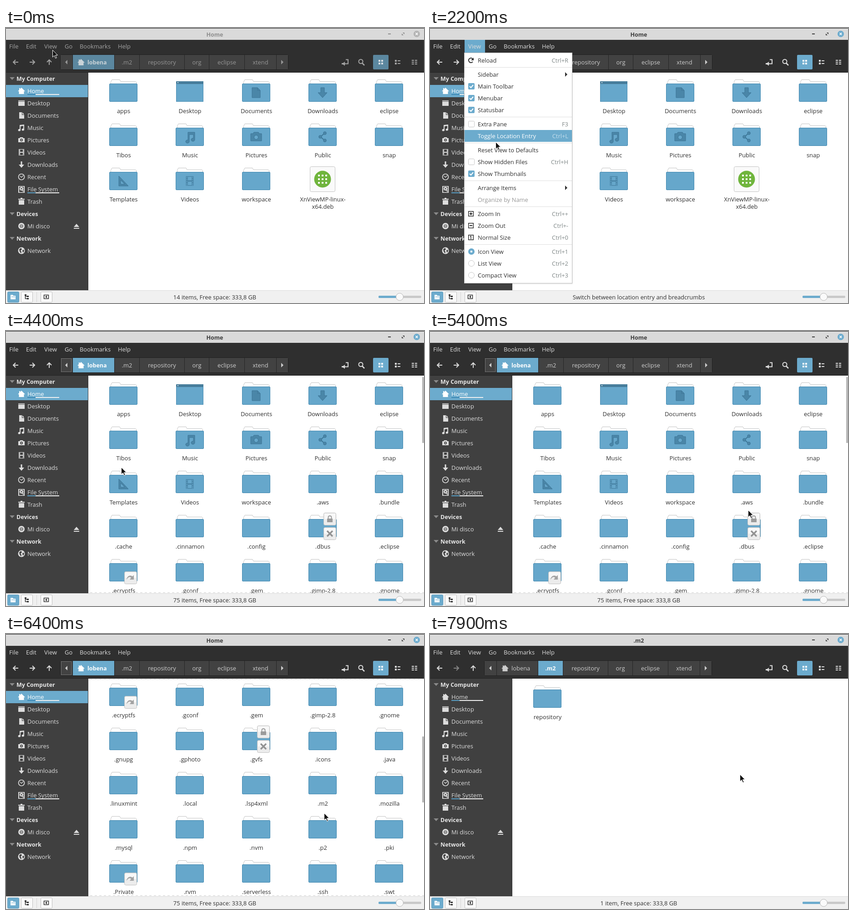
Recreate the animation shown at these times as an HTML page. Size 919 px wide and 604 px high, loop 8000 ms.

```html
<!DOCTYPE html>
<html lang="en">
<head>
<meta charset="utf-8">
<title>File manager</title>
<style>
html, body { margin: 0; width: 100%; height: 100%; overflow: hidden; background: #fff; }
svg { display: block; width: 919px; height: 604px; font: 12.9px 'Open Sans', 'Noto Sans', sans-serif; }
</style>
</head>
<body>
<svg id="stage" viewBox="0 0 919 604"></svg>
<script>
const stage = document.getElementById('stage');
const BLUE = '#6cabcd', LIGHT = '#dcdcdc', DARK = '#303030';

const rect = (x, y, w, h, fill, more = '') => `<rect x="${x}" y="${y}" width="${w}" height="${h}" fill="${fill}" ${more}/>`;
const box = (x, y, w, h, fill, line, r = 2) => rect(x + .5, y + .5, w - 1, h - 1, fill, `stroke="${line}" rx="${r}"`);
const circle = (x, y, r, fill, more = '') => `<circle cx="${x}" cy="${y}" r="${r}" fill="${fill}" ${more}/>`;
const shape = (d, fill, more = '') => `<path d="${d}" fill="${fill}" ${more}/>`;
const line = (d, color, w = 1, more = '') => shape(d, 'none', `stroke="${color}" stroke-width="${w}" ${more}`);
const at = (x, y, s) => `<g transform="translate(${x} ${y})">${s}</g>`;
const text = (x, y, s, fill, anchor = 'start', more = '') =>
  `<text x="${x}" y="${y}" fill="${fill}" text-anchor="${anchor}" ${more}>${s}</text>`;
const bold = 'font-weight="700" font-size="12.5"';

function mix(a, b, k) {
  const part = (c, i) => parseInt(c.slice(i, i + 2), 16);
  return `rgb(${[1, 3, 5].map(i => Math.round(part(a, i) + (part(b, i) - part(a, i)) * k))})`;
}

// Piecewise linear track of [frame, ...values]
function track(keys, f) {
  let i = keys.findIndex(k => k[0] > f);
  if (i < 0) return keys[keys.length - 1].slice(1);
  if (i === 0) return keys[0].slice(1);
  const a = keys[i - 1], b = keys[i], k = (f - a[0]) / (b[0] - a[0]);
  return a.slice(1).map((v, j) => Math.round(v + (b[j + 1] - v) * k));
}
const pointer = [[19, 102, 48], [20, 108, 78], [21, 126, 160], [22, 144, 250], [23, 154, 266], [24, 160, 272],
  [26, 160, 272], [27, 160, 280], [28, 160, 281], [29, 160, 281], [31, 150, 284], [42, 150, 284], [50, 562, 345],
  [51, 562, 345], [52, 600, 366], [53, 692, 405], [54, 699, 393], [65, 699, 393], [69, 697, 316], [78, 697, 316], [79, 681, 308]];
const scroll = [[56, 0], [57, 70], [58, 205], [59, 331], [64, 392], [65, 400], [66, 402], [67, 403]];

// Icons drawn around their own centre
const home = c => shape('M0-7L8 1H5.500V7H-5.500V1H-8L-5-2V-6H-3V-4Z', c);
const doc = c => shape('M-5-7H1V-1H6V7H-5ZM2-7L6-2H2Z', c);
const note = c => shape('M-4-6L6-7V4A2.700 2.300 0 1 1 4 2V-4L-2-3V5A2.700 2.300 0 1 1-4 3Z', c);
const camera = (c, hole) => shape('M-7-4H-4L-3-6H3L4-4H7V5H-7Z', c) + circle(0, 0, 3, hole) + circle(0, 0, 1.3, c);
const film = (c, hole) => rect(-6, -7, 12, 14, c) + rect(-3, -6, 6, 5, hole) + rect(-3, 1, 6, 5, hole) +
  [-6, -3, 0, 3, 5].map(y => rect(-5, y, 1, 1.5, hole) + rect(4, y, 1, 1.5, hole)).join('');
const down = c => shape('M-1.500-7H1.500V0H6L0 7L-6 0H-1.500Z', c);
const disc = (c, hole) => circle(0, 0, 7, c) + circle(0, 0, 3.6, hole) + circle(0, 0, 2.4, c) + circle(0, 0, 1, hole);
const GREY = '#404040';
const sideIcons = [
  home, c => rect(-7, -6, 14, 12, c) + rect(-7, -4.5, 14, 1, GREY), doc, note, c => camera(c, GREY), c => film(c, GREY), down,
  c => circle(0, 0, 6.500, 'none', `stroke="${c}" stroke-width="1.700"`) + line('M-3-2L0 1L4-3', c, 1.3),
  c => rect(-7, -7, 14, 15, c) + rect(-5, -5.500, 10, 12, GREY) + circle(0, -1, 4, c) + circle(0, -1, 1.5, GREY) + line('M1 0L4 5', c, 2),
  c => shape('M-7-6H-2V-8H2V-6H7V-4H-7ZM-6-3H6V7H-6Z', c)
];
const sideNames = ['Home', 'Desktop', 'Documents', 'Music', 'Pictures', 'Videos', 'Downloads', 'Recent', 'File System', 'Trash'];
const globe = c => circle(0, 0, 7.5, c) + shape('M-5-3L-1-6L1-3L-2 0L0 3L-1 6L-4 2ZM2-1L6-2L5 3L3 4Z', GREY);

function sidebar(f, x, y) {
  const inHome = f < 75;
  let s = rect(0, 98, 181, 478, GREY) + rect(180, 98, 1, 478, '#383838');
  if (inHome) s += rect(0, 125, 180, 27, BLUE);
  if (f >= 36 && x < 180) s += rect(0, 260, 180, 27, '#555');
  [['My Computer', 111], ['Devices', 408], ['Network', 462]].forEach(([n, c]) =>
    s += shape(`M8 ${c - 3}H19L13.500 ${c + 3}Z`, '#8a8a8a') + text(23, c + 5, n, '#e6e6e6', 'start', bold));
  sideNames.forEach((n, i) => {
    const c = 138 + 27 * i, ink = i === 0 && inHome ? '#fff' : LIGHT;
    s += at(34, c, sideIcons[i](ink)) + text(47, c + 5, n, ink);
    if (i === 0 || i === 8) s += rect(47, c + 7, 18, 2, i === 0 && inHome ? '#3d89b5' : '#5a9fc5') + rect(65, c + 7, 52, 2, '#f0f0f0');
  });
  return s + at(34, 435, disc(LIGHT, GREY)) + text(47, 440, 'Mi disco', LIGHT) +
    shape('M149 437L155 430L161 437ZM149 439H161V441H149Z', LIGHT) + at(34, 489, globe(LIGHT)) + text(47, 494, 'Network', LIGHT);
}

const INK = '#4a86a8', FRONT = '#66a7cb';
const marks = {
  Documents: () => shape('M-9-11H3L9-5V11H-9Z', INK, 'stroke="#3c7596"') + line('M3-11V-5H9', '#3c7596'),
  Downloads: () => shape('M-4-11H4V0H10L0 11L-10 0H-4Z', INK, 'stroke="#3c7596"'),
  Music: () => shape('M-4-10H11V6A4 3.500 0 1 1 8 3V-5H-1V10A4 3.500 0 1 1-4 7Z', INK, 'stroke="#3c7596"'),
  Pictures: () => shape('M-12-7H-7L-5-10H5L7-7H12V9H-12Z', INK, 'stroke="#3c7596"') + circle(0, 1, 4.5, FRONT, 'stroke="#3c7596"'),
  Public: () => line('M5-8L-5 0L5 8', '#3c7596', 2) + circle(5, -8, 3.3, INK, 'stroke="#3c7596"') +
    circle(-5, 0, 3.3, INK, 'stroke="#3c7596"') + circle(5, 8, 3.3, INK, 'stroke="#3c7596"'),
  Templates: () => shape('M-10-11L11 11H-10ZM-6-2V7H3Z', INK, 'stroke="#3c7596" fill-rule="evenodd"'),
  Videos: () => at(0, 0, `<g transform="scale(1.4 1.5)">${film(INK, FRONT)}</g>`)
};
const badge = (y, d, more) => box(33, y, 28, 28, '#ececec', '#c0c0c0', 3) + rect(35, y + 2, 24, 12, '#f8f8f8') +
  at(47, y + 14, d);
const lock = shape('M-6-1H6V7H-6Z', '#9b9b9b') + line('M-3.500-1V-4A3.500 3 0 0 1 3.500-4V-1', '#9b9b9b', 2);
const cross = line('M-6-6L6 6M6-6L-6 6', '#929292', 3.5);
const link = shape('M-9 4C-8-4-1-7 4-3L7-6V4H-2L1 0C-2-3-6-1-9 4Z', '#a3a3a3');
const denied = badge(-14, lock) + badge(18, cross), linked = badge(18, link);
const badges = { '.dbus': denied, '.gvfs': denied, '.ecryptfs': linked, '.Private': linked };

function folder(name, state) {
  if (name === 'Desktop') return rect(1, -5, 60, 45, state ? '#8abddb' : FRONT) + rect(1, -5, 60, 6, '#447a98') +
    line('M8-2H60', '#689cb9', 1, 'stroke-dasharray="1 2"') + rect(4, -3, 2, 2, '#dfeaf0') + line('M1.500 0V39.500H60.500V0', '#4b8db2');
  if (name === 'deb') return box(41, 0, 0, 0, 'none', 'none');
  const fill = state === 'on' ? '#4c8cb4' : state ? '#8abddb' : FRONT;
  return shape('M3.500 2V-3.500L6-8.500H23L25-4.500H58L59.500-3V2Z', '#fff', 'stroke="#c3c3c3"') +
    box(0, 0, 62, 40, fill, '#3f86ae', 1.5) + (marks[name] ? at(31, 20, marks[name]()) : '') + (badges[name] || '');
}
const bundle = box(3, -12, 56, 56, '#fafafa', '#c2c2c2', 3) + circle(31, 16, 18.5, '#70b53d') +
  [-8, 0, 8].map(a => [-8, 0, 8].map(b => rect(29 + a, 14 + b, 4, 4, '#fff', 'rx="1"')).join('')).join('');

const shown = 'apps Desktop Documents Downloads eclipse Tibos Music Pictures Public snap Templates Videos workspace'.split(' ');
const hidden = ('.aws .bundle .cache .cinnamon .config .dbus .eclipse .ecryptfs .gconf .gem .gimp-2.8 .gnome .gnupg .gphoto .gvfs ' +
  '.icons .java .linuxmint .local .lsp4xml .m2 .mozilla .mysql .npm .nvm .p2 .pki .Private .rvm .serverless .ssh .swt').split(' ');

function files(f, px, py) {
  let list = shown, s = '';
  const all = f >= 37 && f < 75;
  if (f === 36 || f === 75) list = [];
  else if (all) list = shown.concat(hidden);
  else if (f > 75) list = ['repository'];
  const [off] = all ? track(scroll, f) : [0];
  const hover = (f >= 43 && f < 57) || (f >= 66 && f < 72);
  list.forEach((n, i) => {
    const x = 227 + 146 * (i % 5), y = 122 + 97 * Math.floor(i / 5) - off;
    const over = hover && px >= x && px <= x + 62 && py >= y - 9 && py <= y + 41;
    const on = n === '.m2' && f >= 72;
    s += at(x, y, folder(n, on ? 'on' : over ? 'over' : '') + (on ? rect(17, 51, 29, 19, BLUE, 'rx="3"') : '') +
      text(31.5, 65, n, on ? '#fff' : DARK, 'middle'));
  });
  if (f < 36) s += at(665, 316, bundle + text(31.5, 65, 'XnViewMP-linux-', DARK, 'middle') + text(31.5, 81, 'x64.deb', DARK, 'middle'));
  if (all) {
    const dash = 'stroke-dasharray="5 5"';
    s += line('M185 574.500H919', '#cfcfcf', 1, dash);
    if (off) s += line('M185 99.500H919', '#cfcfcf', 1, dash);
    if (f >= 44) s += rect(915, 101 + Math.round(off * .317), 4, 145, '#b8b8b8', 'rx="1"');
  }
  return `<g clip-path="url(#view)">${rect(181, 98, 738, 478, '#fff')}${s}</g>`;
}

function header(f, k) {
  const ink = mix('#a4a4a4', '#dcdcdc', k), soft = mix('#969696', '#cccccc', k), blue = mix('#5b879f', '#6cabcd', k);
  const deep = f >= 75, win = mix('#8e8e8e', '#3c3c3c', k);
  let s = rect(0, 0, 919, 26, '#dadada') + rect(0, 0, 919, 1, '#2b2b2b') + rect(0, 26, 919, 72, '#2f2f2f') + rect(0, 97, 919, 1, '#222');
  s += text(459, 19, deep ? '.m2' : 'Home', win, 'middle', bold) + rect(840, 12, 6, 2, win) +
    shape('M872 10H876V14ZM870 12V16H874Z', win) + circle(903, 13, 7, mix('#b4b4b4', '#6cabcd', k)) +
    line('M900.500 10.500L905.500 15.500M905.500 10.500L900.500 15.500', '#fff', 1.6);
  if (f >= 13 && f < 36) s += rect(76, 26, 45, 28, BLUE);
  [['File', 7], ['Edit', 44], ['View', 84], ['Go', 129], ['Bookmarks', 162], ['Help', 246]].forEach(([n, x]) => s += text(x, 45, n, ink));
  const fore = deep ? '#858585' : ink;
  s += line('M27 75H16M21 70L16 75L21 80', ink, 2) + line('M52 75H63M58 70L63 75L58 80', fore, 2) + line('M95 81V70M90 75L95 70L100 75', ink, 2);

  const d = deep ? 1 : 0;
  const edges = [120, 147, 239 - d, 294 - d, 393 - d, 447 - d, 525 - d, 595 - d, 621 - d];
  const names = ['', 'lobena', '.m2', 'repository', 'org', 'eclipse', 'xtend', ''];
  s += box(119, 58, 502 - d, 34, '#424242', '#202020', 2);
  names.forEach((n, i) => {
    const x = edges[i], w = edges[i + 1] - x - 1, active = i === (deep ? 2 : 1);
    const c = active ? mix('#c9d3d8', '#ffffff', k) : soft, style = active ? bold : '';
    s += rect(x, 59, w, 32, active ? blue : '#424242');
    if (i) s += rect(x - 1, 59, 1, 32, '#252525');
    if (i === 1) s += at(165, 75, home(c)) + text(179, 80, n, c, 'start', style);
    else s += text(x + w / 2, 80, n, c, 'middle', style);
  });
  s += shape('M135 70V80L130 75Z', soft) + shape(`M${605 - d} 70V80L${610 - d} 75Z`, soft);
  if (f >= 36 && f < 72) s += line('M121.500 60.500H143.500V89.500H121.500Z', '#999', 1, 'stroke-dasharray="1 1"');

  s += rect(807, 59, 34, 32, blue, 'rx="2"') + line('M747 69.500H752V78.500H742', ink, 2) + shape('M745 74V83L739 78.500Z', ink) + rect(738, 77, 3, 3, ink) +
    circle(780, 73.5, 4.5, 'none', `stroke="${ink}" stroke-width="2"`) + line('M783 77L788 82', ink, 2.5);
  const white = mix('#d5dde2', '#ffffff', k);
  for (const y of [70, 76]) s += rect(819, y, 4, 4, white) + rect(825, y, 4, 4, white) + rect(855, y, 4, 4, ink) + rect(861, y + 1, 6, 2, ink);
  for (const y of [70, 74, 78]) s += rect(892, y, 5, 2, ink) + rect(899, y, 5, 2, ink);
  return s;
}

// [label, centre, shortcut, kind]
const menuRows = [['Reload', 71, 'Ctrl+R', 'reload'], ['Sidebar', 102, '', 'sub'], ['Main Toolbar', 128, '', 'on'], ['Menubar', 154, '', 'on'],
  ['Statusbar', 180, '', 'on'], ['Extra Pane', 211, 'F3', 'off'], ['Toggle Location Entry', 237, 'Ctrl+L'], ['Reset View to Defaults', 268, ''],
  ['Show Hidden Files', 294, 'Ctrl+H', 'off'], ['Show Thumbnails', 320, '', 'on'], ['Arrange Items', 351, '', 'sub'],
  ['Organize by Name', 377, '', 'dim'], ['Zoom In', 408, 'Ctrl++', 'in'], ['Zoom Out', 434, 'Ctrl+-', 'out'], ['Normal Size', 460, 'Ctrl+0', 'one'],
  ['Icon View', 491, 'Ctrl+1', 'pick'], ['List View', 517, 'Ctrl+2', 'ring'], ['Compact View', 543, 'Ctrl+3', 'ring']];
const frame = box(-6, -6, 12, 12, '#fff', DARK, 0) + line('M-5-5H5V5H-5Z', DARK);
const menuIcons = {
  reload: line('M4-3A5 5 0 1 0 4 3', DARK, 2) + shape('M6-6V0H0Z', DARK),
  on: rect(-7, -7, 14, 14, BLUE, 'rx="2"') + line('M-4 0L-1 3L4-3', '#fff', 2),
  off: box(-7, -7, 14, 14, '#fff', '#c6c6c6'),
  sub: shape('M206-5V5L211 0Z', DARK),
  in: frame + line('M-3 0H3M0-3V3', DARK, 2), out: frame + line('M-3 0H3', DARK, 2), one: frame + line('M-2-2L0-3V4', DARK, 1.5),
  pick: circle(0, 0, 7, BLUE) + circle(0, 0, 2.3, '#fff'),
  ring: circle(0, 0, 6.5, '#fff', 'stroke="#c6c6c6"')
};
const hits = (f, y) => f < 20 ? -1 : menuRows.findIndex(r => y >= r[1] - 13 && y <= r[1] + 13 && !(r[1] === 268 && y >= 281));

function menu(hot) {
  let s = rect(74, 54, 240, 509, '#000', 'opacity=".08" rx="2"') + box(75, 54, 238, 507, '#fff', '#c2c2c2', 0);
  for (const y of [86, 195, 252, 335, 392, 475]) s += rect(76, y, 236, 1, '#dedede');
  menuRows.forEach(([n, c, key, kind], i) => {
    const lit = i === hot;
    if (lit) s += rect(76, c - 13, 236, 26, BLUE);
    s += text(105, c + 5, n, lit ? '#fff' : kind === 'dim' ? '#979797' : DARK) + text(304, c + 5, key, lit ? '#c4dfed' : '#7f8787', 'end');
    if (menuIcons[kind]) s += at(kind === 'reload' || kind === 'in' || kind === 'out' || kind === 'one' ? 90 : 91, c, menuIcons[kind]);
  });
  return s;
}
const hints = {
  Reload: 'Reload the current location', Menubar: "Change the visibility of this window's menubar",
  'Toggle Location Entry': 'Switch between location entry and breadcrumbs',
  'Reset View to Defaults': 'Reset sorting order and zoom level to match preferences for this view',
  'Show Hidden Files': 'Toggle the display of hidden files in the current window'
};

function status(f, hot) {
  const space = ', Free space: 333,8 GB';
  let msg = '14 items' + space;
  if (f >= 75) msg = '1 item' + space;
  else if (f >= 72) msg = '“.m2” selected (containing 1 item)' + space;
  else if (f >= 37) msg = '75 items' + space;
  else if (hot >= 0) msg = hints[menuRows[hot][0]] || msg;
  return rect(0, 576, 919, 28, '#f0f0f0') + rect(0, 576, 919, 1, '#dadada') +
    box(3, 579, 26, 24, BLUE, '#5a9abd') + shape('M10 586H15L16 588H21V596H10Z', '#fff') + rect(12, 590, 8, 1, BLUE) +
    box(33, 579, 26, 24, '#fafafa', '#c0c0c0') + line('M42.500 586V594.500H47M42.500 589.500H47', DARK, 1.5) + rect(41, 585, 4, 3, DARK) +
    rect(46, 588, 4, 3, DARK) + rect(46, 593, 4, 3, DARK) + rect(67, 580, 1, 22, '#d4d4d4') +
    box(76, 579, 26, 24, '#fafafa', '#c0c0c0') + rect(83.5, 586.5, 10, 8, 'none', `stroke="${DARK}" stroke-width="1.5"`) +
    shape('M90 587.500V593.500L86 590.500Z', DARK) + text(459, 596, msg, DARK, 'middle') +
    rect(819, 588, 94, 5, '#c9c9c9', 'rx="2"') + rect(819, 588, 46, 5, BLUE, 'rx="2"') + circle(865.5, 590.5, 8, '#fafafa', 'stroke="#b5b5b5"');
}

const arrow = shape('M.500 .500V16L4.200 12.500L6.900 18.500L9.300 17.500L6.700 11.700H11.500Z', '#111', 'stroke="#fff" stroke-width="1"');

function render(f) {
  const [x, y] = track(pointer, f);
  const open = f >= 14 && f < 36, hot = open ? hits(f, y) : -1;
  const focus = Math.max(0, Math.min(1, (f - 12) / 3));
  stage.innerHTML = `<clipPath id="view">${rect(181, 98, 738, 478, '#fff')}</clipPath>` +
    files(f, x, y) + sidebar(f, x, y) + header(f, focus) + status(f, hot) + (open ? menu(hot) : '') + at(x, y, arrow);
}

let last = -1;
const start = performance.now();
function tick() {
  const f = Math.floor((performance.now() - start) % 8000 / 100);
  if (f !== last) render(last = f);
  requestAnimationFrame(tick);
}
tick();
</script>
</body>
</html>
```
